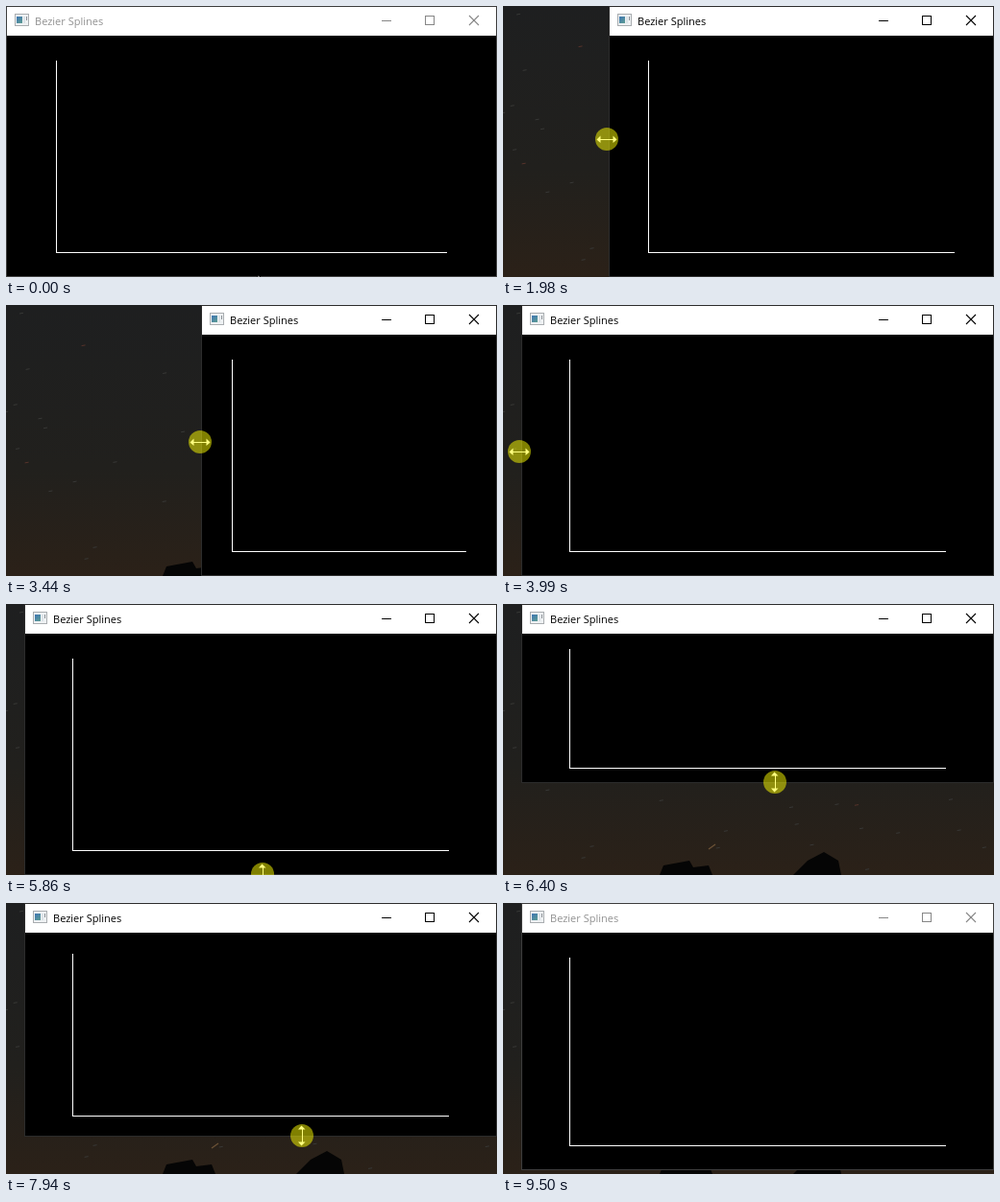
These frames come from a looping animation (511 px wide and 283 px high, 9.65 s). An HTML page with a canvas:

```html
<!DOCTYPE html>
<html lang="en">
<head>
<meta charset="utf-8">
<title>Bezier Splines</title>
<style>
  html, body { margin: 0; width: 100%; height: 100%; overflow: hidden; background: #000; }
  canvas { display: block; width: 511px; height: 283px; }
</style>
</head>
<body>
<canvas id="stage" width="511" height="283"></canvas>
<script>
const W = 511, H = 283, LOOP = 9650, TITLE = 31;
const SIDE_DRAG = 1512, SIDE_DROP = 4297, BASE_DRAG = 5855, BASE_DROP = 8797, BLUR = 9497;
const ctx = document.getElementById('stage').getContext('2d', { alpha: false });

// Key points [time, value], joined by a smooth curve.
const leftKeys = [[SIDE_DRAG, 1], [1975, 111], [2748, 270], [2900, 279], [3440, 188], [3985, 20]];
const bottomKeys = [[5870, 282], [6780, 116], [7090, 108], [7180, 108], [8165, 270], [8620, 278]];
const sideGripKeys = [[1975, 139], [2748, 132], [3985, 153]];

// Cubic through the keys; flat at the ends and turning points.
function curve(keys, t) {
  const last = keys.length - 1;
  if (t <= keys[0][0]) return keys[0][1];
  if (t >= keys[last][0]) return keys[last][1];
  const slope = (i, j) => (keys[j][1] - keys[i][1]) / (keys[j][0] - keys[i][0]);
  const tangent = i => {
    if (i === 0 || i === last) return 0;
    const before = slope(i - 1, i), after = slope(i, i + 1);
    return before * after > 0 ? 2 * before * after / (before + after) : 0;
  };
  const i = keys.findIndex(key => key[0] > t) - 1;
  const [[t0, a], [t1, b]] = [keys[i], keys[i + 1]];
  const span = t1 - t0, k = (t - t0) / span, r = 1 - k;
  return a * (1 + 2 * k) * r * r + b * k * k * (3 - 2 * k)
    + span * k * r * (tangent(i) * r - tangent(i + 1) * k);
}

const glide = (t, t0, t1, a, b) => curve([[t0, a], [t1, b]], t);

// The screen refreshes in small discrete steps.
function snap(t) {
  const [start, step] = t < SIDE_DRAG ? [0, 71] : t < BASE_DRAG ? [SIDE_DRAG, 77.3] : [BASE_DRAG, 77];
  return start + Math.floor((t - start) / step) * step;
}

function randomizer(seed) {
  return () => (seed = (seed * 16807) % 2147483647) / 2147483647;
}

function rect(x, y, w, h, color) {
  ctx.fillStyle = color;
  ctx.fillRect(x, y, w, h);
}

function polygon(points, fill, outline) {
  ctx.beginPath();
  points.forEach(([x, y]) => ctx.lineTo(x, y));
  ctx.closePath();
  if (outline) {
    ctx.strokeStyle = outline;
    ctx.lineWidth = 2;
    ctx.stroke();
  }
  ctx.fillStyle = fill;
  ctx.fill();
}

function line(x0, y0, x1, y1, color, width = 1) {
  ctx.strokeStyle = color;
  ctx.lineWidth = width;
  ctx.beginPath();
  ctx.moveTo(x0, y0);
  ctx.lineTo(x1, y1);
  ctx.stroke();
}

function drawWallpaper() {
  const sky = ctx.createLinearGradient(0, 0, 0, H);
  sky.addColorStop(0, '#1e1f20');
  sky.addColorStop(0.6, '#21201d');
  sky.addColorStop(1, '#2b2118');
  rect(0, 0, W, H, sky);

  const random = randomizer(41);
  for (let i = 0; i < 45; i++) {
    const x = random() * W, y = random() * H;
    line(x - 2, y + 0.7, x + 2, y, random() < 0.15 ? '#56332a' : '#383836');
  }
  line(214, 256, 221, 251, '#6b5236', 1.3);

  polygon([[163, 283], [167, 273], [194, 268], [198, 275], [214, 273], [218, 283]], '#050505');
  polygon([[302, 283], [317, 268], [334, 259], [349, 268], [352, 283]], '#050505');
}

function drawIcon(x) {
  rect(x, 8, 15, 13, '#a9adb0');
  rect(x + 1, 9, 13, 11, '#eef1f3');
  const pane = ctx.createLinearGradient(x + 2, 11, x + 8, 18);
  pane.addColorStop(0, '#3f76b4');
  pane.addColorStop(1, '#5c9c92');
  rect(x + 2, 11, 6, 7, pane);
  rect(x + 9, 11, 2, 7, '#dbe3e7');
  rect(x + 12, 11, 1, 4, '#8b9096');
}

function drawButtons(color) {
  line(391, 15.5, 401, 15.5, color);
  ctx.strokeRect(436.5, 10.5, 9, 9);
  line(482, 10, 492, 20, color, 1.1);
  line(492, 10, 482, 20, color, 1.1);
}

function drawAxes(left, bottom) {
  const width = 510 - left, height = bottom - TITLE;
  const x0 = Math.round(left + width * 0.1), x1 = Math.round(left + width * 0.9);
  const y0 = Math.round(TITLE + 0.9 + height * 0.1), y1 = Math.round(TITLE + height * 0.9);
  rect(x0, y0, 1, y1 - y0 + 1, '#fff');
  rect(x0, y1, x1 - x0, 1, '#fff');
}

function drawWindow(left, bottom, active) {
  rect(left - 1, 0, W - left + 1, bottom + 1, active ? '#2c2c2c' : '#3d3d3d');
  rect(left, 1, 510 - left, TITLE - 1, '#fff');
  rect(left, TITLE, 510 - left, bottom - TITLE, '#000');
  drawIcon(left + 8);
  ctx.font = '11px "Open Sans", "Noto Sans", sans-serif';
  ctx.fillStyle = active ? '#000' : '#919191';
  ctx.fillText('Bezier Splines', left + 29, 20);
  drawButtons(active ? '#000' : '#868686');
  drawAxes(left, bottom);
}

function drawPointer(x, y) {
  ctx.save();
  ctx.translate(Math.round(x), Math.round(y));
  polygon([[0.5, 0.5], [0.5, 15], [4, 11.8], [6.4, 17], [8.4, 16], [6.2, 11], [10.8, 11]],
    '#fff', '#000');
  ctx.restore();
}

function drawGrip(x, y, vertical, pressed) {
  ctx.save();
  ctx.translate(x, y);
  if (vertical) ctx.rotate(Math.PI / 2);
  rect(-8, vertical ? -1 : 0, 16, 1, '#fff');
  for (const side of [-1, 1]) {
    polygon([[side * 10.5, 0.5], [side * 6.5, -3.5], [side * 6.5, 4]], '#fff');
  }
  ctx.restore();
  if (!pressed) return;
  ctx.fillStyle = 'rgba(255, 255, 0, 0.5)';
  ctx.beginPath();
  ctx.arc(x, y, 12, 0, Math.PI * 2);
  ctx.fill();
}

function drawCursor(t, now, left, bottom) {
  if (t < 1050) {
    drawPointer(glide(now, 0, 360, 262, 5), glide(now, 0, 360, 281, 142) - glide(now, 420, 980, 0, 13));
  } else if (t < SIDE_DROP) {
    const x = Math.round(left * 1.004 - 3), y = Math.round(curve(sideGripKeys, now));
    drawGrip(x, y, false, t >= SIDE_DRAG);
  } else if (t < 5390) {
    drawPointer(glide(now, 4220, 4690, 17, 272) - glide(now, 4800, 5230, 0, 5),
      glide(now, 4220, 4690, 153, 276) + glide(now, 4800, 5230, 0, 7));
  } else if (t < 8950) {
    const x = Math.round(glide(now, BASE_DRAG, 7090, 267, 306) + glide(now, 7180, 8165, 0, 2));
    drawGrip(x, bottom, true, t >= BASE_DRAG && t < BASE_DROP);
  }
}

function frame() {
  const t = performance.now() % LOOP, now = snap(t);
  const left = Math.round(curve(leftKeys, now));
  const bottom = Math.round(curve(bottomKeys, now));
  drawWallpaper();
  drawWindow(left, bottom, t >= SIDE_DRAG && t < BLUR);
  drawCursor(t, now, left, bottom);
  requestAnimationFrame(frame);
}
frame();
</script>
</body>
</html>
```
